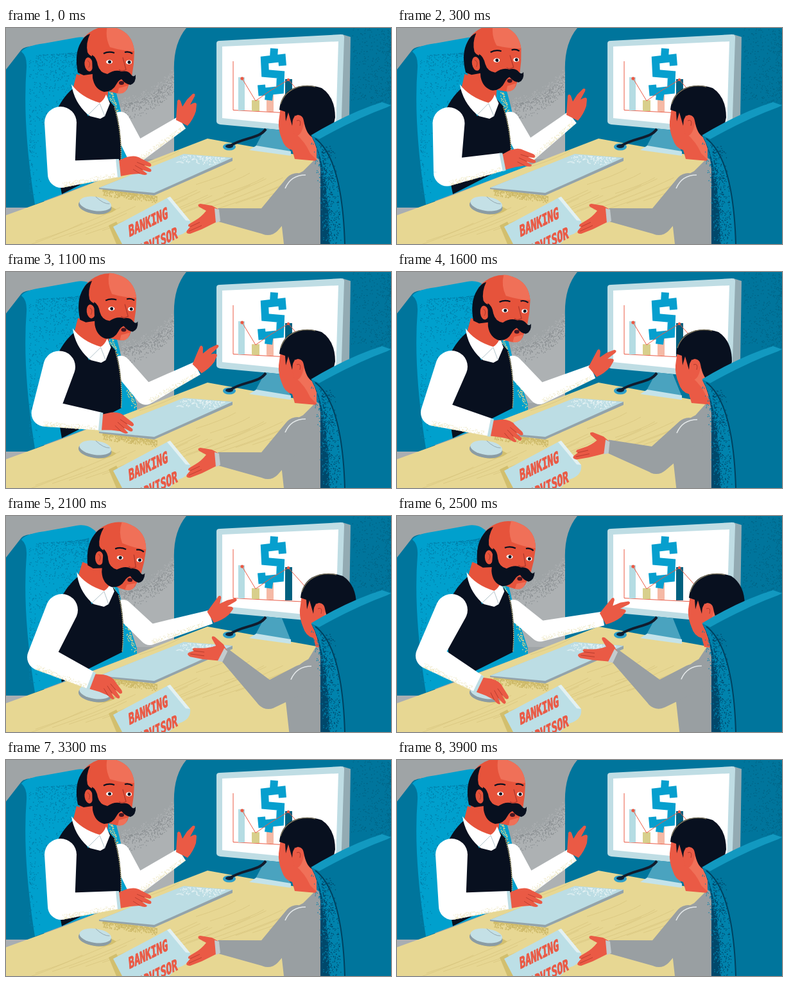
These frames come from a looping animation (600 by 338 pixels, 4.2 s). An HTML page:

```html
<!DOCTYPE html>
<html lang="en">
<head>
<meta charset="utf-8">
<title>Banking advisor</title>
<style>
html, body { margin: 0; width: 100%; height: 100%; overflow: hidden; background: #9fa4a6; }
svg { display: block; width: 100vw; height: 100vh; }
.plate { font: bold 16px "DejaVu Sans Mono", monospace; fill: #ea5a45; stroke: #ea5a45; stroke-width: .8; }
</style>
</head>
<body>
<svg viewBox="0 0 600 338">
  <!-- room -->
  <path fill="#9fa4a6" d="M0 0H600V338H0Z"/>
  <path fill="#adb1b3" d="M165 128Q235 112 266 72V205H165Z"/>
  <g id="wallGrain"></g>
  <path fill="#00759c" d="M281 0H600V338H262V70Q260 25 281 0Z"/>
  <g id="blueGrain"></g>
  <!-- left chair -->
  <path fill="#00759c" d="M0 65L24 34Q28 29 45 28L60 281H0Z"/>
  <path fill="#00a0cd" d="M24 37Q30 28 60 24L110 15Q138 10 152 44Q172 95 180 135L204 207V216L45 276Q25 150 32 62Q33 44 24 37Z"/>
  <g id="chairGrain"></g>
  <!-- monitor -->
  <path fill="#93abb3" d="M524 10L537 14L535 140L520 168Z"/>
  <path fill="#bfdde4" d="M328 24Q328 20 333 20L522 10Q528 10 527 16L522 168L334 151Q328 150 328 146Z"/>
  <path fill="#fff" d="M337 29L518 21L514 159L337 141Z"/>
  <path fill="none" stroke="#ea5a45" d="M354 52V128.500L480 135"/>
  <path fill="#b5dce3" d="M362 77H372V129H362Z"/>
  <path fill="#d8cf8c" d="M383 113H395V130H383Z"/>
  <path fill="#f5b9a5" d="M406 97H417V131H406Z"/>
  <path fill="#00607f" d="M435 80H446V132H435Z"/>
  <path fill="none" stroke="#069fce" stroke-width="12" d="M431 59L430 47L403 50L404 71L428 73L427 97L399 100L398 89M418 32L417 47M411 97L409 113"/>
  <path fill="none" stroke="#ea5a45" d="M368 79L389 114L412 98L440 81L472 117"/>
  <g fill="#ea5a45"><circle cx="368" cy="79" r="2.600"/><circle cx="440" cy="81" r="2.200"/></g>
  <!-- desk -->
  <path fill="#a9aeb2" d="M0 281H60V300H0Z"/>
  <path fill="#e7d793" d="M0 293L88 261L314 173L484 204L460 338H0Z"/>
  <path id="wood" fill="none" stroke="#d9c67f" stroke-width=".8"/>
  <path fill="#4aa3bf" d="M404 157L430 160L444 195L388 187Z"/>
  <path fill="#c4e3ea" d="M390 184L444 193V200L379 191Z"/>
  <ellipse cx="348" cy="186" rx="10" ry="5.500" fill="#2d9fc9"/>
  <ellipse cx="348" cy="185" rx="6" ry="3" fill="#10243a"/>
  <path fill="none" stroke="#111c2d" stroke-width="4" d="M405 158C394 174 372 170 348 185"/>
  <g id="shadeGrain"></g>
  <path fill="#93a3aa" d="M145 250L277 198L353 203V208L231 262L145 252Z"/>
  <path fill="#bcdde4" d="M145 250L277 197L353 203L231 258Z"/>
  <g id="keyGrain"></g>
  <path fill="#d2bf6e" d="M118 284Q150 300 172 284L163 279Z"/>
  <g transform="rotate(8 139 277)">
    <ellipse cx="139" cy="279" rx="26" ry="12" fill="#8b9ca4"/>
    <ellipse cx="139" cy="275" rx="25" ry="11" fill="#c4e0e6"/>
    <path fill="none" stroke="#8b9ca4" stroke-width=".8" d="M138 264Q152 274 161 272"/>
  </g>
  <path fill="#d2bf6e" d="M160 309L172 303L190 338H172Z"/>
  <path fill="#bcdfe6" d="M167 311L255 264L287 302Q289 319 268 325L254 338H181Z"/>
  <path fill="#e3f1f2" d="M251 266L256 264L287 302L280 301Z"/>
  <g class="plate">
    <text transform="matrix(.9 -.44 .13 1.5 192 327)">BANKING</text>
    <text transform="matrix(.9 -.44 .13 1.5 207 358)">ADVISOR</text>
  </g>

  <!-- advisor -->
  <path id="farArm" fill="#fff"/>
  <g id="farGrain"></g>
  <path id="farHand" fill="#ea5a45" d="M-9 -4L-8 -20L-7 -34Q-5 -38 -2 -34L1 -25L8 -36L17 -45Q22 -46 20 -41L13 -28Q23 -34 23 -28L22 -18Q18 -5 9 5Z"/>
  <g id="torso">
    <path fill="#08101f" d="M76 135Q88 108 104 95L128 138L158 110L170 124Q182 165 179 213L87 260L78 210Z"/>
    <path fill="none" stroke="#b5ad7c" stroke-width="1.500" stroke-dasharray="2 1" d="M169 124Q181 165 179 212"/>
    <path fill="#e6533b" d="M110 72L160 90L158 112L146 124Q115 112 105 92Z"/>
    <path fill="#fff" d="M102 88Q116 108 146 117Q152 114 156 104L162 118L154 138L147 142L131 138L127 135Q106 116 102 88Z"/>
    <path fill="none" stroke="#a9bcc4" stroke-width=".9" d="M128 136L146 118L154 138"/>
  </g>
  <g id="head">
    <path fill="#e6533b" d="M112 64Q108 22 130 7Q150 -7 172 0Q197 8 200 36L199 56L196 76L189 95Q184 104 172 102L145 96L116 76Z"/>
    <path fill="#f07058" d="M158 -3Q154 14 162 30Q182 36 200 36Q197 8 172 0Q165 -3 158 -3ZM176 94Q184 92 190 90L187 98Q182 104 174 102Z"/>
    <path fill="#08101f" d="M112 70Q106 40 117 22Q122 12 131 9Q124 24 127 38Q130 44 137 45L135 72L121 74Z"/>
    <ellipse cx="129" cy="57" rx="6.500" ry="11" fill="#e6533b" transform="rotate(-8 129 57)"/>
    <path fill="none" stroke="#b0392c" d="M127 51Q133 54 129 62"/>
    <path fill="#08101f" d="M134 42Q141 46 143 58Q146 70 158 72Q170 64 180 68Q190 66 195 73Q199 78 202 73Q203 86 194 89Q186 88 180 80Q175 82 172 88Q166 100 153 100Q138 96 135 78Z"/>
    <ellipse cx="180" cy="86" rx="4" ry="3" fill="#451622"/>
    <g fill="#fff"><ellipse cx="161" cy="53" rx="5" ry="3.200"/><ellipse cx="191.500" cy="53.500" rx="4.500" ry="3.200"/></g>
    <g fill="#08101f"><circle cx="161.500" cy="53" r="2.500"/><circle cx="192" cy="53.500" r="2.500"/></g>
    <path fill="none" stroke="#08101f" stroke-width="2.200" d="M152 40Q160 36 169 39M185 38Q191 36 197 40"/>
    <path fill="none" stroke="#b0392c" stroke-width="1.300" d="M182 46L187 65Q180 69 176 65"/>
  </g>
  <path id="nearArm" fill="#fff"/>
  <g id="nearGrain"></g>
  <g id="nearHand">
    <path fill="#ea5a45" d="M0 -11L14 -17Q28 -21 36 -15L50 -8Q55 -4 50 -2L41 -4L52 2Q54 7 48 6L38 3L46 9Q45 13 34 9L20 10L4 13Z"/>
    <path fill="none" stroke="#b0392c" stroke-width=".8" d="M30 -9L42 -4M27 -4L39 3M24 2L35 9"/>
    <path fill="#bcdde4" d="M-3 -14L2 -14L5 14L0 15Z"/>
  </g>

  <!-- client -->
  <path id="body" fill="#999fa2"/>
  <path id="arm" fill="#999fa2"/>
  <path id="fold" fill="none" stroke="#e4e8e9" stroke-width="1.600"/>
  <g id="hand">
    <path fill="#ea5a45" d="M5 -9L-4 -14L-22 -17Q-28 -16 -24 -12L-13 -6Q-21 4 -30 9L-40 15Q-43 19 -38 19L-43 25Q-46 30 -38 30L-20 23L-6 16L6 10Z"/>
    <path fill="none" stroke="#b0392c" stroke-width=".8" d="M-38 19L-23 12M-40 26L-20 17"/>
    <path fill="#c3cbce" d="M0 -10L7 -8L9 10L2 13Z"/>
  </g>
  <g id="face">
    <path fill="#ea5a45" d="M429 116L425 146Q424 160 430 174Q434 188 446 191L450 205L484 208L482 150Z"/>
    <path fill="#f07058" d="M452 166Q466 178 474 196L484 206V168L464 150Z"/>
    <path fill="#08101f" d="M426 128Q428 106 444 96Q466 85 492 94Q513 108 513 140L506 172L478 171Q468 167 464 145L450 137L446 153L440 132L436 146L435 131Z"/>
    <path fill="none" stroke="#77705a" stroke-width="1.500" d="M428 119Q434 99 456 92Q470 89 482 92"/>
    <path fill="#ea5a45" d="M447 158Q444 138 455 136Q465 137 464 150Q461 167 453 169Q448 168 447 158Z"/>
    <path fill="none" stroke="#b0392c" d="M453 145Q461 142 458 153"/>
  </g>
  <!-- right chair -->
  <path fill="#00759c" d="M476 169Q535 134 586 116L600 121V338H490V220Q488 190 476 169Z"/>
  <path fill="#0083ad" d="M476 169Q524 200 528 338H490V220Q488 190 476 169Z"/>
  <path fill="#00486b" d="M476 169Q502 210 504 338H490V220Q488 190 476 169Z"/>
  <g id="backGrain"></g>
  <path fill="#1299c0" d="M475 168Q535 132 586 116L600 121L594 124Q545 142 488 174Z"/>
  <path fill="none" stroke="#00415f" stroke-width="2" d="M482 173Q524 204 528 338"/>
</svg>
<script>
const $ = id => document.getElementById(id);
const set = (id, k, v) => $(id).setAttribute(k, v);

let seed = 7;
const rnd = () => (seed = (seed * 16807) % 2147483647) / 2147483647;

// scatter n small dots; at(u, v) places each one
function grain(id, n, color, at, size = 1.3) {
  let d = '';
  for (let i = 0; i < n; i++) {
    const [x, y] = at(rnd(), rnd());
    d += `M${x.toFixed(1)} ${y.toFixed(1)}h${size}v${size}h-${size}z`;
  }
  $(id).innerHTML += `<path fill="${color}" d="${d}"/>`;
}

grain('wallGrain', 420, '#8a8f92', (u, v) => [180 + 82 * u, 118 - 46 * u * u + 26 * v * v]);
grain('wallGrain', 200, '#adb1b3', (u, v) => [180 + 82 * u, 120 - 46 * u * u - 14 * v * v]);
grain('blueGrain', 500, '#006385', (u, v) => [600 - 62 * u * u, 8 + 125 * v - 20 * u]);
grain('chairGrain', 700, '#007ea9', (u, v) => [128 - 82 * u * u, 42 + 110 * v * v - 8 * (1 - u)]);
grain('chairGrain', 160, '#007ea9', (u, v) => [36 + 18 * v * v, 50 + 210 * u]);
grain('chairGrain', 170, '#d8cf8c', (u, v) => [158 + 45 * u - 7 * v * v, 80 + 132 * u], 1.5);
grain('shadeGrain', 420, '#cdb968', (u, v) => [150 + 85 * u, 252 + 11 * u + 10 * v * v], 1.5);
grain('keyGrain', 150, '#e9f4f5', (u, v) => [277 + 66 * u - 14 * v, 198 + 5 * u + 12 * v * v]);
grain('backGrain', 380, '#00486b', (u, v) => [487 + 16 * Math.sqrt(u) + 20 * v * v, 182 + 156 * u]);
grain('backGrain', 160, '#0083ad', (u, v) => [484 + 20 * Math.sqrt(u) - 12 * v * v, 178 + 160 * u]);
grain('nearGrain', 190, '#ece5bd', (u, v) => [u * 82, 20 - 6 * u - 7 * v * v], 1.1);
grain('farGrain', 150, '#ece5bd', (u, v) => [u * 85, 14 - 4 * u - 7 * v * v], 1.1);

let lines = '';
for (let i = 0; i < 17; i++) {
  const x = 20 + i * 26, y = 335 - i * 5 + rnd() * 10, l = 90 + rnd() * 90;
  lines += `M${x} ${y}q${l * .5} ${-l * .16} ${l} ${-l * .4}`;
}
for (let i = 0; i < 7; i++) lines += `M${270 + i * 22} ${192 + i * 7}q-20 12 -62 25`;
set('wood', 'd', lines);

// head x, y, turn | lean | shoulder | elbow | wrist, turn | far elbow | far wrist, turn
const A = [0, 0, 0, 0, 85, 148, 86, 229, 174, 219, 0, 203, 195, 274, 148, 0];
const B = [-10, -4, -5, -7, 76, 150, 70, 224, 153, 200, -10, 203, 194, 272, 132, 0];
const C = [7, 7, 1, 4, 85, 148, 58, 220, 145, 243, 17, 222, 191, 305, 156, 24];
const D = [15, 11, 6, 7, 87, 147, 54, 221, 132, 257, 27, 224, 186, 319, 158, 32];
const E = [11, 8, 5, 4, 83, 147, 46, 216, 121, 267, 36, 222, 175, 323, 163, 38];
const advisor = [[0, A], [600, B], [750, B], [1250, C], [1650, C], [2050, D], [2300, D],
  [2700, E], [2920, E], [3300, A], [4200, A]];

// head x, y | shoulder | elbow | wrist, turn
const rest = [0, 0, 454, 249, 408, 303, 325, 292, 0];
const reach = [33, 0, 463, 254, 409, 281, 335, 215, 32];
const client = [[0, rest], [1350, rest], [1600, [9, 0, 455, 250, 404, 295, 323, 272, 12]],
  [2050, reach], [2350, reach], [2900, [11, 0, 457, 251, 402, 279, 329, 222, 28]],
  [3300, rest], [4200, rest]];

function pose(keys, t) {
  let i = 1;
  while (i < keys.length - 1 && t >= keys[i][0]) i++;
  const [t0, a] = keys[i - 1], [t1, b] = keys[i];
  const u = Math.min(1, (t - t0) / (t1 - t0)), k = u * u * (3 - 2 * u);
  return a.map((v, n) => v + (b[n] - v) * k);
}

const disc = (x, y, r) => `M${x - r} ${y}a${r} ${r} 0 1 1 ${2 * r} 0a${r} ${r} 0 1 1 ${-2 * r} 0z`;

// tapered segment, wound the same way as the discs
function bone(x1, y1, r1, x2, y2, r2) {
  const a = Math.atan2(y2 - y1, x2 - x1), s = Math.sin(a), c = Math.cos(a);
  return `M${x1 + s * r1} ${y1 - c * r1}L${x2 + s * r2} ${y2 - c * r2}` +
    `L${x2 - s * r2} ${y2 + c * r2}L${x1 - s * r1} ${y1 + c * r1}z`;
}

const limb = (sx, sy, ex, ey, wx, wy, rs, re, rw) =>
  disc(sx, sy, rs) + bone(sx, sy, rs, ex, ey, re) + disc(ex, ey, re) + bone(ex, ey, re, wx, wy, rw);

const place = (id, x, y, turn) => set(id, 'transform', `translate(${x} ${y}) rotate(${turn})`);
const along = (id, x1, y1, x2, y2) =>
  place(id, x1, y1, Math.atan2(y2 - y1, x2 - x1) * 180 / Math.PI);

function draw(t) {
  const [hx, hy, hr, lean, sx, sy, ex, ey, wx, wy, wr, fx, fy, gx, gy, gr] = pose(advisor, t);
  set('head', 'transform', `translate(${hx} ${hy}) rotate(${hr} 150 70)`);
  const k = -lean / 140;
  set('torso', 'transform', `matrix(1 0 ${k} 1 ${-k * 255} 0)`);
  set('nearArm', 'd', limb(sx, sy, ex, ey, wx, wy, 25, 21, 14));
  along('nearGrain', ex, ey, wx, wy);
  place('nearHand', wx, wy, wr);
  set('farArm', 'd', limb(178 + lean * .6, 146, fx, fy, gx, gy, 15, 16, 11));
  along('farGrain', fx, fy, gx, gy);
  place('farHand', gx, gy, gr);

  const [cx, cy, ux, uy, vx, vy, px, py, pr] = pose(client, t);
  set('face', 'transform', `translate(${cx} ${cy})`);
  const m = cx * .25;
  set('body', 'd', `M${433 + m} 338L${426 + m} 275Q${434 + m} 238 ${463 + m} 224L484 203L510 220V338Z`);
  set('arm', 'd', limb(ux, uy, vx, vy, px + 4, py, 22, 21, 10));
  set('fold', 'd', `M${ux - 19} ${uy + 2}Q${ux - 10} ${uy - 19} ${ux + 13} ${uy - 19}`);
  place('hand', px, py, pr);
}

// ten pictures a second, the last one held
function tick(now) {
  draw(Math.min(39, Math.floor(now % 4200 / 100)) * 100);
  requestAnimationFrame(tick);
}
draw(0);
requestAnimationFrame(tick);
</script>
</body>
</html>
```
